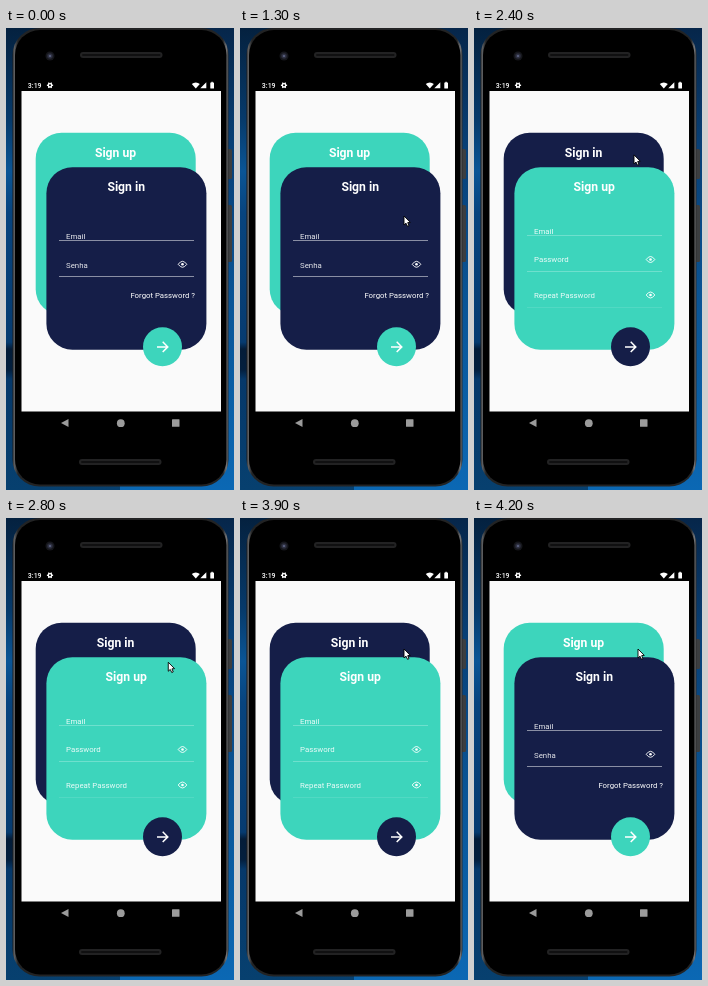
Animation, 228 px wide and 462 px high, one loop 4300 ms. Source, as an HTML page with a canvas:

```html
<!DOCTYPE html>
<html lang="en">
<head>
<meta charset="utf-8">
<title>Sign in / Sign up</title>
<style>
html, body { margin: 0; width: 100%; height: 100%; overflow: hidden; background: #04213f; }
canvas { display: block; width: 228px; height: 462px; }
</style>
</head>
<body>
<canvas id="stage" width="228" height="462"></canvas>
<script>
const ctx = document.getElementById('stage').getContext('2d');
const LOOP = 4300, STEP = 100;
const NAVY = '#151e48', TEAL = '#3dd5bc', WHITE = '#ffffff';

// Pointer path: time, x, y
const path = [
  [700, 229, 216], [1000, 182, 202], [1200, 164, 188], [1300, 164, 188],
  [1700, 160, 126], [2500, 160, 127], [2900, 163, 150], [3000, 164.6, 156.5],
  [3200, 164.6, 156.5], [3400, 178, 158], [3700, 164, 131], [LOOP, 164, 131]
];

function box(x, y, w, h, r, fill) {
  ctx.beginPath();
  ctx.roundRect(x, y, w, h, r);
  ctx.fillStyle = fill;
  ctx.fill();
}

function disc(x, y, r, fill) {
  ctx.beginPath();
  ctx.arc(x, y, r, 0, Math.PI * 2);
  ctx.fillStyle = fill;
  ctx.fill();
}

function shape(points, fill) {
  ctx.beginPath();
  points.forEach(([x, y]) => ctx.lineTo(x, y));
  ctx.closePath();
  ctx.fillStyle = fill;
  ctx.fill();
}

function text(str, x, y, size, weight = 400, align = 'left', color = WHITE) {
  ctx.font = `${weight} ${size}px Roboto, sans-serif`;
  ctx.textAlign = align;
  ctx.fillStyle = color;
  ctx.fillText(str, x, y);
}

function gradient(x0, y0, x1, y1, colors) {
  const g = ctx.createLinearGradient(x0, y0, x1, y1);
  colors.forEach(([at, color]) => g.addColorStop(at, color));
  return g;
}

function desktop() {
  ctx.fillStyle = gradient(0, 0, 0, 462, [
    [0, '#04213f'], [0.2, '#063a6b'], [0.31, '#0a5596'], [0.4, '#07447f'],
    [0.68, '#063b70'], [0.695, '#031c38'], [0.74, '#031f3e'],
    [0.76, '#05386a'], [1, '#07406f']
  ]);
  ctx.fillRect(0, 0, 114, 462);
  ctx.fillStyle = gradient(0, 0, 0, 462, [
    [0, '#06264a'], [0.25, '#083f75'], [0.6, '#0a5597'], [1, '#0b68b4']
  ]);
  ctx.fillRect(114, 0, 114, 462);
}

function speaker(x, y) {
  box(x, y, 82.5, 6, 3, '#222223');
  box(x + 2, y + 2, 78.5, 2, 1, '#101011');
}

function phone() {
  box(221, 121, 5, 30, 1.5, '#3c3e40');
  box(221, 177, 5, 57, 1.5, '#3c3e40');
  box(6.5, 0, 216, 458.5, 27, gradient(6.5, 0, 222.5, 0, [
    [0, '#1c1c1d'], [0.008, '#606163'], [0.025, '#222324'],
    [0.975, '#222324'], [0.99, '#77787a'], [1, '#2a2b2c']
  ]));
  box(9, 2, 211.5, 454.5, 25, '#000');
  speaker(74, 24);
  speaker(73, 431);
  disc(44, 28, 4.5, '#15161b');
  disc(44, 28, 2.8, '#2b2d3c');
  disc(44, 28, 1.3, '#555b78');

  ctx.fillStyle = '#fafafa';
  ctx.fillRect(15.5, 63, 199.5, 320.5);
}

function statusBar() {
  text('3:19', 21.8, 60, 7, 500);
  ctx.strokeStyle = WHITE;
  ctx.lineWidth = 1.3;
  for (let i = 0; i < 6; i++) {
    const a = i * Math.PI / 3;
    ctx.beginPath();
    ctx.moveTo(44, 57.3);
    ctx.lineTo(44 + 3.1 * Math.cos(a), 57.3 + 3.1 * Math.sin(a));
    ctx.stroke();
  }
  disc(44, 57.3, 2.4, WHITE);
  disc(44, 57.3, 1, '#000');

  ctx.beginPath();
  ctx.moveTo(189.8, 60.5);
  ctx.arc(189.8, 60.5, 6, -2.3, -0.84);
  ctx.fillStyle = WHITE;
  ctx.fill();
  shape([[194.3, 60.3], [200.3, 60.3], [200.3, 54.3]], WHITE);
  box(204.3, 54.5, 3.7, 6, 0.5, WHITE);
  ctx.fillRect(205.3, 53.8, 1.6, 1);
}

function navBar() {
  const grey = '#9b9b9b';
  shape([[55, 395], [62.5, 391], [62.5, 399]], grey);
  disc(114.8, 395.2, 3.9, grey);
  box(166, 391.3, 7.5, 7.5, 0.5, grey);
}

function eye(y) {
  ctx.strokeStyle = WHITE;
  ctx.lineWidth = 0.9;
  ctx.beginPath();
  ctx.moveTo(172.2, y);
  ctx.quadraticCurveTo(176.5, y - 6, 180.8, y);
  ctx.quadraticCurveTo(176.5, y + 6, 172.2, y);
  ctx.stroke();
  disc(176.5, y, 1.3, WHITE);
}

function field(label, baseline, lineY, lineColor, eyeY) {
  text(label, 60, baseline, 7.85, 400, 'left', 'rgba(255,255,255,.9)');
  ctx.fillStyle = lineColor;
  ctx.fillRect(53, lineY, 135, 1);
  if (eyeY) eye(eyeY);
}

function cards(signUp) {
  const front = signUp ? TEAL : NAVY, back = signUp ? NAVY : TEAL;
  box(29.7, 104.7, 160, 182.5, 26, back);
  text(signUp ? 'Sign in' : 'Sign up', 109.5, 128.6, 12.2, 700, 'center');
  box(40.4, 139.2, 160, 182.5, 26, front);
  text(signUp ? 'Sign up' : 'Sign in', 120.2, 162.6, 12.2, 700, 'center');

  if (signUp) {
    const line = 'rgba(255,255,255,.25)';
    field('Email', 206, 207, line);
    field('Password', 234.3, 243, line, 231.5);
    field('Repeat Password', 270, 279, 'rgba(255,255,255,.1)', 267);
  } else {
    const line = 'rgba(255,255,255,.5)';
    field('Email', 211, 212, line);
    field('Senha', 239.5, 248, line, 236.3);
    text('Forgot Password ?', 189, 269.7, 7.8, 400, 'right');
  }

  disc(156.5, 318.7, 19.5, back);
  ctx.strokeStyle = WHITE;
  ctx.lineWidth = 1.5;
  ctx.beginPath();
  ctx.moveTo(151, 318.9);
  ctx.lineTo(161.7, 318.9);
  ctx.moveTo(156.7, 313.8);
  ctx.lineTo(161.8, 318.9);
  ctx.lineTo(156.7, 324);
  ctx.stroke();
}

function pointer(t) {
  const i = path.findIndex(p => p[0] > t);
  if (i < 1) return;
  const [t0, x0, y0] = path[i - 1], [t1, x1, y1] = path[i];
  const k = (t - t0) / (t1 - t0);
  ctx.save();
  ctx.translate(x0 + (x1 - x0) * k, y0 + (y1 - y0) * k);
  shape([[0, 0], [0, 9], [2, 7.2], [3.5, 10.3], [5, 9.6], [3.7, 6.6], [6.3, 6.4]], WHITE);
  ctx.strokeStyle = '#000';
  ctx.lineWidth = 0.9;
  ctx.stroke();
  ctx.restore();
}

function draw(now) {
  const t = Math.floor(now % LOOP / STEP) * STEP;
  desktop();
  phone();
  statusBar();
  navBar();
  cards(t >= 2400 && t < 4000);
  pointer(t);
  requestAnimationFrame(draw);
}
requestAnimationFrame(draw);
</script>
</body>
</html>
```
